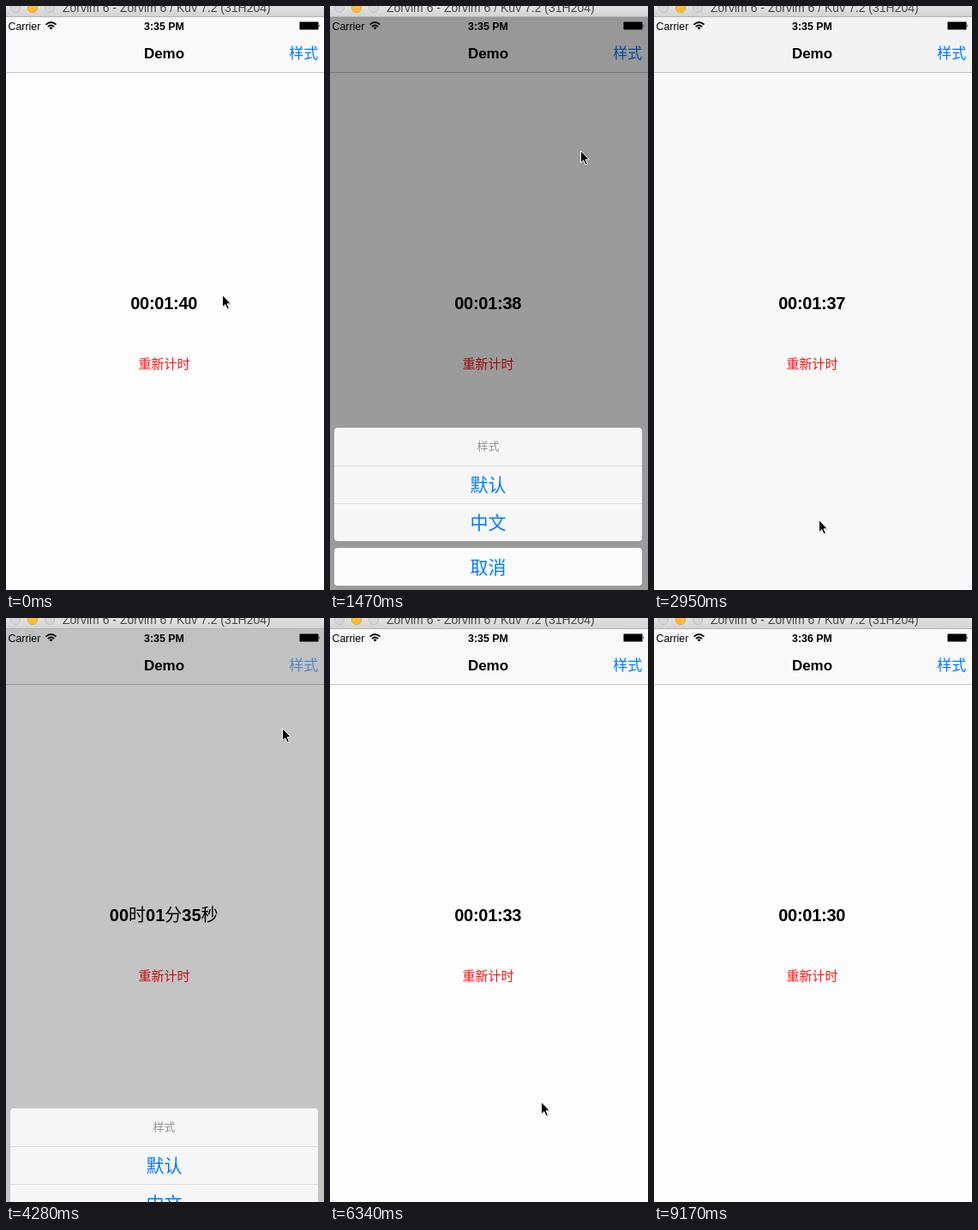
An HTML page that plays this animation: 371x680 px, repeating every 9320 ms.

```html
<!DOCTYPE html>
<html lang="zh-CN">
<head>
<meta charset="utf-8">
<title>Countdown demo</title>
<style>
  html, body { margin: 0; width: 100%; height: 100%; overflow: hidden; background: #fefefe; }
  svg { display: block; width: 371px; height: 680px; }
  text { font-family: "Liberation Sans", Arial, sans-serif; }
  .cjk { font-family: "Noto Sans CJK SC", "Noto Sans CJK", sans-serif; font-weight: 300; }
  .mid { text-anchor: middle; }
  .bold { font-weight: 700; }
  .medium { font-weight: 500; }
  .blue { fill: #007aff; }
  .row { font-size: 21px; }
</style>
</head>
<body>
<svg viewBox="0 0 371 680" xmlns="http://www.w3.org/2000/svg">
  <defs>
    <linearGradient id="chrome" x2="0" y2="1">
      <stop offset="0" stop-color="#e2e2e2"/>
      <stop offset="1" stop-color="#d2d2d2"/>
    </linearGradient>
  </defs>

  <rect width="371" height="680" fill="#fefefe"/>
  <rect y="13" width="371" height="64" fill="#f9f9f9"/>
  <rect y="77" width="371" height="1" fill="#c8c8c8"/>

  <!-- status bar -->
  <text x="2.5" y="27.5" font-size="12.4">Carrier</text>
  <g fill="none" stroke="#000" stroke-width="1.9">
    <path d="M46.6 21.6Q52.5 16.4 58.4 21.6"/>
    <path d="M48.9 24.1Q52.5 20.9 56.1 24.1"/>
  </g>
  <path d="M50.4 25.3Q52.5 23.7 54.6 25.3L52.5 27.6Z"/>
  <text id="clock" class="mid bold" x="184.5" y="27.5" font-size="12.4"></text>
  <rect x="342.5" y="18.5" width="22" height="9" rx="1" stroke="#777" stroke-width=".8"/>
  <path d="M365.5 21.2Q367.3 23 365.5 24.8Z"/>

  <text class="mid bold" x="184.5" y="61" font-size="17">Demo</text>
  <text id="style" class="cjk blue" x="330.3" y="61" font-size="17">样式</text>
  <text id="timer" class="mid bold" x="184.2" y="353" font-size="20"></text>
  <text class="cjk mid" x="184.5" y="421.6" font-size="15" fill="#ff1414">重新计时</text>

  <rect id="dim" y="13" width="371" height="667"/>

  <g id="sheet">
    <rect width="359" height="132" rx="4" fill="#f7f7f7"/>
    <rect y="44" width="359" height="1" fill="#dedede"/>
    <rect y="88" width="359" height="1" fill="#dedede"/>
    <text class="cjk mid" x="179.5" y="26" font-size="13" fill="#929292">样式</text>
    <text class="cjk mid blue row" x="179.5" y="74">默认</text>
    <text class="cjk mid blue row" x="179.5" y="118">中文</text>
    <rect y="140" width="359" height="44" rx="4" fill="#fcfcfc"/>
    <text class="cjk mid blue row medium" x="179.5" y="170">取消</text>
  </g>

  <!-- window title bar -->
  <rect width="371" height="13" fill="url(#chrome)"/>
  <rect y="12" width="371" height="1" fill="#b4b4b4"/>
  <g fill="#d6d6d6" stroke="#c2c2c2">
    <circle cx="11" cy="2" r="5.6"/>
    <circle cx="31" cy="2" r="5.6" fill="#ffbd2e" stroke="#e5a72c"/>
    <circle cx="51" cy="2" r="5.6"/>
  </g>
  <text x="66" y="7" font-size="14" fill="#484848">Zorvim 6 - Zorvim 6 / Kuv 7.2 (31H204)</text>

  <g id="cursor">
    <path d="M.5 1.5V16L4 13L6.3 18L8.8 17L6.6 12H11Z" opacity=".2"/>
    <path d="M.5 .6V14.7L3.8 11.7L6.2 17L8.4 16L6.1 10.8H10.4Z" stroke="#fff"/>
  </g>
</svg>
<script>
const LOOP = 9320, STEP = 147.9;
const TICK = 6.775;                       // one second, in steps
const SLIDE = 3;                          // length of a sheet slide, in steps

const [clock, style, timer, dim, sheet, cursor] =
  ["clock", "style", "timer", "dim", "sheet", "cursor"].map(id => document.getElementById(id));

const clamp = u => Math.max(0, Math.min(1, u));
const easeOut = u => 1 - (1 - clamp(u)) ** 3;
const smooth = u => (u = clamp(u), u * u * (3 - 2 * u));
const mix = (a, b, u) => a + (b - a) * u;

// times in steps at which the action sheet opens and closes
const visits = [{ open: 7.76, close: 18.19 }, { open: 28.27, close: 34 }];

// pointer strokes: from step, to step, target x, target y
const home = [252, 336];
const strokes = [
  [0, 6, 352, 54],
  [8, 10, 292, 168],
  [10, 14, 192, 598],
  [21, 27, 345, 54],
  [27.7, 33, 194, 547],
  [38, 43, 246, 563],
  [43, 45, 294, 577],
  [46, 51, 312, 674],
  [51, 53, 316, 700]
];

function pointer(n) {
  return strokes.reduce(([px, py], [from, to, x, y]) => {
    const u = smooth((n - from) / (to - from));
    return [mix(px, x, u), mix(py, y, u)];
  }, home).map(Math.round);
}

function setTimer(sec, chinese) {
  const unit = c => chinese ? `<tspan class="cjk medium">${c}</tspan>` : "";
  const colon = chinese ? "" : ":";
  timer.setAttribute("letter-spacing", chinese ? 0 : -.27);
  timer.innerHTML = `00${unit("时")}${colon}01${unit("分")}${colon}${sec}${unit("秒")}`;
}

function draw(n) {
  setTimer(39 - Math.floor((n - 1) / TICK), n >= 22 && n < 36);
  clock.textContent = n < 49 ? "3:35 PM" : "3:36 PM";

  const visit = visits[n < 22 ? 0 : 1];
  const rise = easeOut((n - visit.open) / SLIDE);
  const fall = easeOut((n - visit.close) / SLIDE);
  const top = Math.round(680 - 192 * rise + 205 * fall);
  sheet.setAttribute("transform", `translate(5 ${top})`);
  dim.setAttribute("opacity", .4 * (rise - fall));
  style.setAttribute("opacity", rise > 0 ? Math.max(.25, rise) : 1);

  cursor.setAttribute("transform", `translate(${pointer(n)})`);
}

let start = null, last = -1;
function frame(now) {
  if (start === null) start = now;
  const n = Math.min(62, Math.floor(((now - start) % LOOP + 40) / STEP));
  if (n !== last) draw(last = n);
  requestAnimationFrame(frame);
}
draw(0);
requestAnimationFrame(frame);
</script>
</body>
</html>
```
